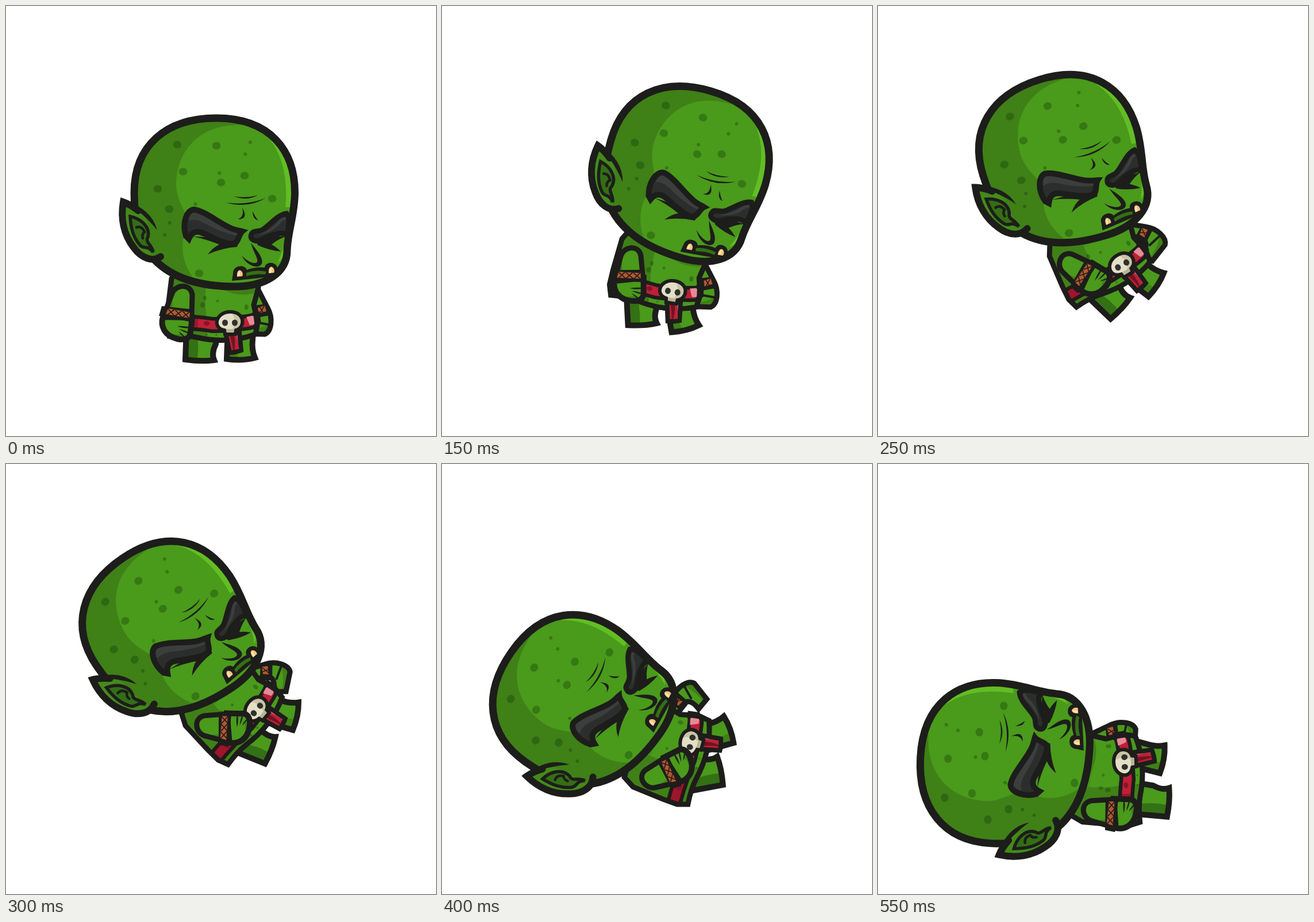
An HTML page with a canvas for the animation above (750 ms loop, 748 px wide and 748 px high).

```html
<!DOCTYPE html>
<html lang="en">
<head>
<meta charset="utf-8">
<title>Goblin fall</title>
<style>
html, body { margin: 0; width: 100%; height: 100%; overflow: hidden; background: #fff; }
canvas { display: block; }
</style>
</head>
<body>
<canvas id="stage" width="748" height="748"></canvas>
<script>
const ctx = document.getElementById('stage').getContext('2d');
const INK = '#1d1d1b', DARK = '#3f8017', GREEN = '#4a9a1b', LIGHT = '#62bd24', DEEP = '#347014';
const SPOT = 'rgba(20,60,10,.36)', RED = '#c01f38', PINK = '#e58a98';
const LOOP = 750, STEP = 50, REST = 550;

// Moments: stand, recoil, airborne, landing, rest. Everything moves linearly between them.
const MOMENTS = [0, 150, 300, 450, REST];
const HIP = { pivot: [390, 550], x: [390, 402, 436, 431, 428], y: [550, 496, 426, 512, 518], turn: [0, 9, -50, -87, -92] };

// Parts hang from the torso at their pivot; spread is how far they slide along it after landing.
const PARTS = [
  { draw: armFar, pivot: [430, 512], turn: [0, 0, -80, -155, -88], spread: [0, 0] },
  { draw: legFar, pivot: [410, 578], turn: [0, -12, -76, -124, -78], spread: [-8, 5] },
  { draw: legNear, pivot: [340, 578], turn: [0, -5, -70, -119, -87], spread: [-17, 9] },
  { draw: torso, pivot: HIP.pivot, turn: HIP.turn, spread: [0, 0] },
  { draw: armNear, pivot: [306, 497], turn: [0, -7, -96, -138, -95], spread: [0, -11] },
  { draw: head, pivot: [375, 468], turn: [0, 16.2, -34, -65.4, -86.9], spread: [20, 1] }
];

function fill(d, color) {
  ctx.fillStyle = color;
  ctx.fill(new Path2D(d));
}

function line(d, width, color = INK) {
  ctx.strokeStyle = color;
  ctx.lineWidth = width;
  ctx.stroke(new Path2D(d));
}

// Filled shape with clipped details and an outline on top.
function shape(d, color, width, details) {
  fill(d, color);
  if (details) {
    ctx.save();
    ctx.clip(new Path2D(d));
    details();
    ctx.restore();
  }
  line(d, width);
}

function oval(x, y, rx, ry = rx, color = SPOT) {
  ctx.fillStyle = color;
  ctx.beginPath();
  ctx.ellipse(x, y, rx, ry, 0, 0, 7);
  ctx.fill();
}

// Curved stroke that tapers at both ends.
function crease(x0, y0, cx, cy, x1, y1, dx, dy) {
  fill(`M${x0} ${y0}Q${cx} ${cy} ${x1} ${y1}Q${cx + dx} ${cy + dy} ${x0} ${y0}Z`, INK);
}

function armFar() {
  shape('M437 490L455 525C465 543 462 566 450 571L415 570L411 548Q430 549 434 540L428 512Z', GREEN, 9, () => {
    fill('M410 562Q438 566 465 550V580H410Z', DARK);
  });
  fill('M431 521L455 518L460 538L430 543Z', INK);
  fill('M438 525L450 521L453 531L439 535Z', '#b4582f');
  line('M441 523L448 534M449 522L442 534', 1.5);
  line('M434 550L456 554', 4);
}

function legFar() {
  shape('M386 560L384 614Q410 618 433 612Q427 598 429 580L430 560Z', GREEN, 10, () => {
    fill('M380 560H404Q396 590 405 620H380Z', DARK);
  });
}

function legNear() {
  shape('M314 560L312 615Q340 619 362 616Q357 604 365 588L368 560Z', GREEN, 10, () => {
    fill('M308 560H331Q337 590 332 620H308Z', DEEP);
  });
}

function torso() {
  shape('M300 455L288 474L281 530L279 556L284 574Q310 572 330 576Q385 589 434 571L437 555L435 538L431 520L439 490L425 455Z', GREEN, 9, () => {
    fill('M270 450H358Q340 495 350 548V590H270Z', DARK);
    fill('M325 480Q370 500 440 488L430 500Q405 506 384 496Z', DARK);
    oval(342, 520, 4, 5);
    oval(346, 508, 3, 4);
    oval(318, 508, 5, 6);
    oval(368, 513, 2.5);
    oval(418, 524, 3.5, 5);
    const belt = 'M270 550Q320 549 360 555Q405 555 445 545';
    line(belt, 28);
    line(belt, 15, RED);
    fill('M270 540H334V561H270Z', 'rgba(80,0,15,.3)');
    fill('M418 541L440 536V553L424 555Z', PINK);
    for (const x of [308, 349]) oval(x, 552, 5, 4, '#8a1426');
    for (const x of [349, 366, 421]) oval(x, 572, 1.8);
  });
  line('M431 536L438 535L440 550L434 556', 7);

  shape('M382 568L406 568L409 599Q398 603 389 603Z', RED, 8, () => {
    fill('M388 570H396Q401 588 396 606Q394 586 388 570Z', '#701421');
    fill('M402 570L409 598H404Q405 585 400 570Z', PINK);
  });
  shape('M380 564C358 560 365 532 390 532C416 532 417 559 400 564L399 571L381 571Z', '#e3dfc7', 6, () => {
    fill('M389 530Q407 547 386 575H420V530Z', '#c9c4a6');
    fill('M370 562H408V576H370Z', '#b9b495');
  });
  for (const x of [381, 398]) oval(x, 551, 5, 5.5, '#30302c');
}

function armNear() {
  shape('M273 541C268 557 276 574 298 579C310 582 321 579 321 566L324 542Z', GREEN, 10, () => {
    fill('M265 552Q282 576 304 570L325 582V590H265Z', DARK);
  });
  crease(298, 557, 310, 556, 326, 560, 0, 6);
  crease(301, 562, 312, 564, 324, 571, -1, 5);
  crease(300, 566, 308, 570, 314, 580, -3, 3);
  shape('M276 534L289 500C295 484 321 482 324 502L323 540Z', GREEN, 9, () => {
    fill('M270 545L282 492L296 488Q285 505 292 545Z', DARK);
  });
  fill('M271 522L327 528L325 550L266 539Z', INK);
  fill('M282 526L320 533L319 543L278 536Z', '#b4582f');
  for (let i = 0; i < 3; i++) {
    const x = 282 + i * 13, y = 527 + i * 2.3;
    line(`M${x} ${y}l11 12M${x + 11} ${y + 1}l-12 9`, 1.7);
  }
}

function ear() {
  fill('M204 341Q237 350 262 390L272 436C255 446 236 439 222 420C205 398 200 370 204 341Z', '#438b19');
  fill('M234 355Q256 370 266 400L270 430Q255 438 247 425Q258 390 234 355Z', DARK);
  line('M269 436C254 446 235 438 222 420C205 398 199 370 204 341Q216 345 230 356', 12);
  crease(206, 339, 253, 352, 263, 390, -11, 11);
  shape('M216 366C235 370 251 384 247 402C241 411 254 415 256 428C246 415 240 424 233 416C221 402 217 386 216 366Z', '#346e15', 5.5);
  line('M227 385Q236 382 241 393Q236 397 238 404', 4.5);
  crease(250, 439, 268, 441, 272, 430, 4, 5);
}

function browsAndEyes() {
  fill('M325 401Q354 401 378 407L405 410L402 419Q375 421 351 432Q360 420 371 415Q350 406 325 401Z', INK);
  fill('M434 407Q458 398 486 401Q471 407 462 415Q470 419 478 427Q457 425 438 416Z', INK);
  shape('M313 400C306 378 314 355 327 354C346 357 369 376 386 384C396 390 404 390 411 392C404 398 405 412 395 414C378 414 355 400 340 394C328 390 322 396 318 405Z', '#2c2e2e', 10, () => {
    fill('M318 374Q319 355 337 359Q370 381 406 393L402 400Q374 394 344 377Q327 369 318 374Z', '#3c3e3e');
  });
  shape('M427 397C430 389 440 394 448 388C460 380 474 362 488 361C496 371 490 388 489 401C485 391 470 396 458 400C448 404 440 411 433 408C426 406 425 402 427 397Z', '#2c2e2e', 9, () => {
    fill('M440 398Q464 388 476 371Q487 363 490 372Q482 370 474 382Q460 395 440 398Z', '#3c3e3e');
  });
}

function mouth() {
  fill('M393 478L395 465C395 450 416 449 419 459Q435 453 450 455C451 444 471 443 473 458C476 470 466 471 455 471Q436 474 393 478Z', INK);
  fill('M418 464Q436 458 453 462L451 467Q435 465 418 470Z', DEEP);
  for (const [x, y] of [[407, 471], [462, 465]]) {
    fill(`M${x - 5} ${y}c-1 -9 3 -13 6 -11c5 3 4 9 3 10Z`, '#f3c37c');
    fill(`M${x - 4} ${y - 1}q-1 -8 4 -9q1 5 -1 9Z`, '#fbe2b0');
  }
}

function headSpots() {
  const large = [[298, 241], [366, 243], [308, 288], [374, 307], [415, 295], [264, 318], [463, 335], [284, 353], [336, 465]];
  for (const [x, y] of large) oval(x, y, 7.3, 6.6);
  // Small spots run diagonally from the cheek to the crown, denser at the ends.
  for (let i = 0; i < 6; i++) {
    const s = (1 - Math.cos(Math.PI * i / 5)) / 2;
    oval(276 + 155 * s - 6 * (i % 2), 398 - 155 * s - 6 * (i % 2), 3);
  }
}

function head() {
  shape('M366 195C460 195 502.5 252 502.5 325C502 365 490 392 489 425C489 465 450 488 398 488C343 488 291 477 256 439C232 412 223 370 223 325C223 243 278 195 366 195Z', DARK, 13, () => {
    fill('M398 207C330 210 296 258 296 312C297 345 319 360 315 385C300 415 305 455 340 490H510V200Z', GREEN);
    fill('M425 204C475 232 492 285 486 350L510 350V200Z', LIGHT);
    fill('M486 402Q483 425 472 447Q488 436 500 400Z', LIGHT);
    headSpots();
  });
  ear();
  crease(397, 331, 418, 335, 438, 329, 0, 5);
  crease(383, 342, 420, 347, 452, 334, 0, 6);
  crease(411, 351, 415, 367, 403, 371, 8, 4);
  crease(429, 357, 429, 371, 439, 373, 5, -3);
  browsAndEyes();
  fill('M426 412C436 425 448 437 445 448C440 459 418 452 410 434C421 446 434 450 437 445C439 439 430 428 426 412Z', INK);
  mouth();
}

function between(values, time) {
  const i = Math.max(0, MOMENTS.findIndex(m => time <= m) - 1);
  const mix = (time - MOMENTS[i]) / (MOMENTS[i + 1] - MOMENTS[i]);
  return values[i] + (values[i + 1] - values[i]) * mix;
}

function render(time) {
  ctx.setTransform(1, 0, 0, 1, 0, 0);
  ctx.fillStyle = '#fff';
  ctx.fillRect(0, 0, 748, 748);
  ctx.lineJoin = 'miter';
  ctx.miterLimit = 3;
  ctx.lineCap = 'round';
  const rad = Math.PI / 180;
  const lean = between(HIP.turn, time) * rad;
  const slide = between([0, 0, 0, 0, 1], time);
  for (const { draw, pivot: [px, py], turn, spread } of PARTS) {
    ctx.save();
    ctx.translate(between(HIP.x, time), between(HIP.y, time));
    ctx.rotate(lean);
    ctx.translate(px - HIP.pivot[0] + spread[0] * slide, py - HIP.pivot[1] + spread[1] * slide);
    ctx.rotate(between(turn, time) * rad - lean);
    ctx.translate(-px, -py);
    draw();
    ctx.restore();
  }
}

const start = performance.now();
function tick() {
  const t = (performance.now() - start) % LOOP;
  render(Math.min(REST, Math.floor(t / STEP) * STEP));
  requestAnimationFrame(tick);
}
tick();
</script>
</body>
</html>
```
